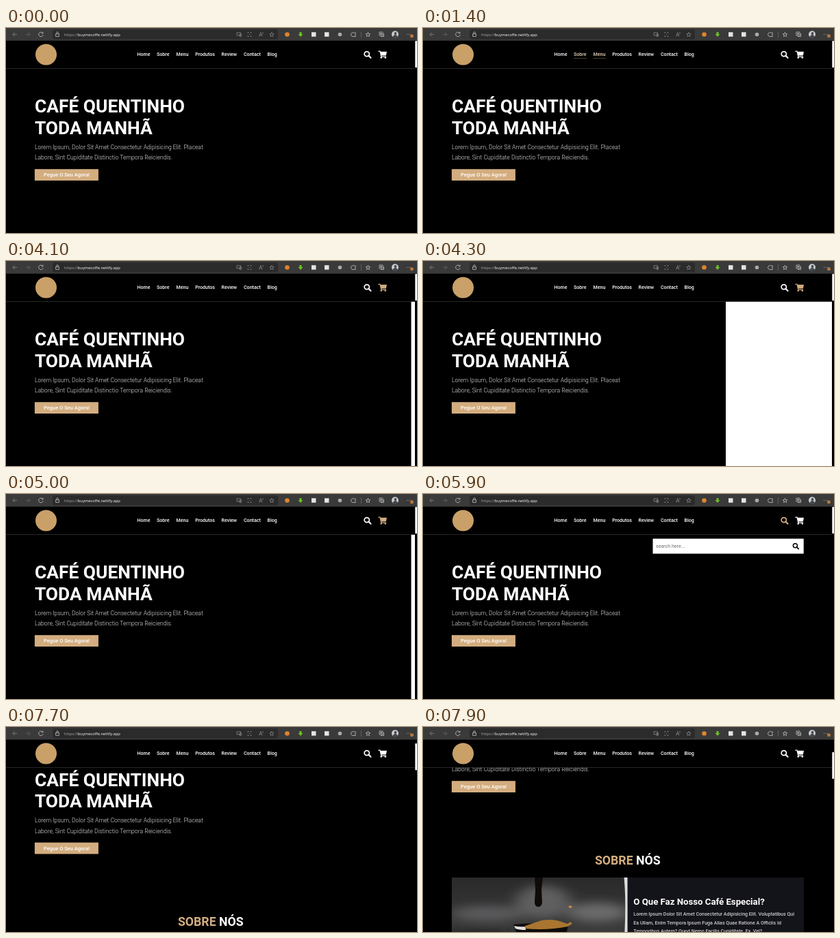
Animation, 600 px wide and 301 px high, one loop 8000 ms. Source, as an HTML page:

```html
<!DOCTYPE html>
<html lang="pt">
<head>
<meta charset="utf-8">
<title>Café</title>
<style>
  html, body { margin: 0; height: 100%; overflow: hidden; background: #000; }
  svg { display: block; width: 100vw; height: 100vh; }
  text { font-family: Roboto, sans-serif; fill: #fff; white-space: pre; }
  .ui { font-family: "Open Sans", sans-serif; }
  .nav text { font-size: 7.09px; font-weight: 500; }
  .title { font-size: 26.4px; font-weight: 700; }
  .lead { font-size: 8.65px; font-weight: 300; fill: #e4e4e4; }
  .body text { font-size: 7.09px; font-weight: 500; fill: #ccc; }
  .line { fill: none; stroke: #c4c4c4; stroke-width: .8; }
</style>
</head>
<body>
<svg viewBox="0 0 600 301">
  <defs>
    <linearGradient id="wall" x2="0" y2="1">
      <stop offset="0" stop-color="#2a2a2b"/>
      <stop offset=".5" stop-color="#3c3c3d"/>
    </linearGradient>
    <filter id="blur" x="-50%" y="-100%" width="200%" height="300%">
      <feGaussianBlur stdDeviation="11 7"/>
    </filter>
    <clipPath id="photo"><rect x="42" y="349" width="256.5" height="172"/></clipPath>
    <g id="lens" fill="none" stroke="currentColor">
      <circle cx="4.5" cy="4.5" r="3.6" stroke-width="1.75"/>
      <path d="M7.2 7.2 10.2 10.2" stroke-width="2.1" stroke-linecap="round"/>
    </g>
    <path id="star" d="M0-3.2 .9-1 3.2-.8 1.4.7 2 3 0 1.7-2 3-1.4.7-3.2-.8-.9-1Z"/>
  </defs>

  <g id="page">
    <text class="title" x="41.9" y="124.4">CAFÉ QUENTINHO</text>
    <text class="title" x="41.9" y="155.6">TODA MANHÃ</text>
    <text class="lead" x="41.9" y="177.5">Lorem Ipsum, Dolor Sit Amet Consectetur Adipisicing Elit. Placeat</text>
    <text class="lead" x="41.9" y="193.4">Labore, Sint Cupiditate Distinctio Tempora Reiciendis.</text>
    <rect x="41.9" y="207.2" width="93" height="16.8" fill="#d3ad7f"/>
    <text x="55" y="218.2" font-size="7.53" font-weight="500">Pegue O Seu Agora!</text>

    <text x="298.8" y="329.5" font-size="17.7" font-weight="700" text-anchor="middle"><tspan fill="#d3ad7f">SOBRE</tspan> NÓS</text>
    <rect x="42" y="349" width="514" height="172" fill="#13131a"/>
    <g clip-path="url(#photo)">
      <rect x="42" y="349" width="257" height="172" fill="url(#wall)"/>
      <g filter="url(#blur)">
        <ellipse cx="95" cy="402" rx="55" ry="11" fill="#5c5c5d"/>
        <ellipse cx="175" cy="385" rx="40" ry="24" fill="#5e5e5f"/>
        <ellipse cx="255" cy="400" rx="45" ry="14" fill="#6a6a6b"/>
        <ellipse cx="80" cy="432" rx="60" ry="8" fill="#262627"/>
      </g>
      <path d="M293.500 349h6v172h-4q-3-50-1-95t-1-77Z" fill="#ddd"/>
      <path d="M163 349h12l-2 17 1 20q-1 6-6 6t-5-7l1-18Z" fill="#100a09"/>
      <path d="M132 418q36-4 80 0l-4 22h-68Z" fill="#0d0b0a"/>
      <path d="M133 420q8 2 17 1v5q-10 0-15-2Z" fill="#e0e0e0"/>
      <path d="M149 420q12-4 24-8 18-3 32 3l6 2 4-3 3 3-7 4q-30 6-62 3Z" fill="#a97630"/>
      <path d="M212 391l4-1 2 3-4 1Z" fill="#c98a3f"/>
    </g>
    <text x="307.3" y="389" font-size="13.2" font-weight="700">O Que Faz Nosso Café Especial?</text>
    <g class="body">
      <text x="307.3" y="405">Lorem Ipsum Dolor Sit Amet Consectetur Adipisicing Elit. Voluptatibus Qui</text>
      <text x="307.3" y="417.7">Ea Ullam, Enim Tempora Ipsum Fuga Alias Quae Ratione A Officiis Id</text>
      <text x="307.3" y="430.4">Temporibus Autem? Quod Nemo Facilis Cupiditate. Ex, Vel?</text>
    </g>
  </g>

  <rect id="panel" y="59.5" width="155" height="242" fill="#fff"/>

  <rect y="18" width="600" height="41" fill="#000"/>
  <rect y="59" width="597" height=".8" fill="#333"/>
  <circle cx="58.5" cy="39" r="15.5" fill="#c9a068"/>
  <g id="nav" class="nav"></g>
  <g id="search" transform="translate(522.3 33.6)"><use href="#lens"/></g>
  <g id="cart" transform="translate(543.4 33.4)" fill="currentColor">
    <path d="M.5.8H2.6L4.5 8.8H11.2" fill="none" stroke="currentColor" stroke-width="1.3" stroke-linecap="round"/>
    <path d="M3 1.4h9.1q.5 0 .4.5l-1 4.7q-.1.5-.6.5H4.2Z"/>
    <circle cx="4.3" cy="10" r="1.25"/><circle cx="10.4" cy="10" r="1.25"/>
  </g>

  <g id="form">
    <rect x="335.5" width="220.2" height="22" fill="#fff"/>
    <text x="340" y="13.3" font-size="7.09" style="fill:#6d6d6d">search here...</text>
    <use href="#lens" transform="translate(539.6 6.3) scale(.85)" color="#000"/>
  </g>

  <rect x="597" y="18" width="3" height="283" fill="#000"/>
  <rect id="thumb" x="597.3" width="2.7" height="39.5" rx="1.2" fill="#fff"/>

  <rect width="600" height="18.6" fill="#3a3a3a"/>
  <rect x="68" y="2.3" width="329" height="14.2" rx="3" fill="#2b2b2b"/>
  <g class="line">
    <path d="M16 9.4H10M12.8 6.5 10 9.4l2.8 2.9" stroke="#888"/>
    <path d="M29 9.4h6M32.2 6.5 35 9.4l-2.8 2.9" stroke="#666"/>
    <path d="M53.6 7.4A3.3 3.3 0 1 0 54.2 10M54 5.6v2.2h-2.2"/>
    <path d="M72.6 8.6h4.8v3.8h-4.8ZM73.7 8.4V7.2q0-1.4 1.3-1.4t1.3 1.4v1.2"/>
    <g stroke="#888">
      <path d="M337 6.8h5.5v4H337ZM341 9h2.6v3.4H341Z"/>
      <path d="M353 8V6.5h1.5M356.5 6.5H358V8M358 11v1.5h-1.5M354.5 12.5H353V11M355 9.5h1"/>
      <path d="M369.5 12.5 371.7 6.5 374 12.5M370.3 10.5h2.8M374.5 6q1.5 1.5 0 3"/>
      <use href="#star" x="388" y="9.5"/>
    </g>
    <path d="M505 7h1.5q.8-2 2 0h1.8v2q-2 1 0 2v1.5H506A3 3 0 0 1 505 7Z"/>
    <path d="M518.5 5v9" stroke="#666"/>
    <use href="#star" x="528.5" y="9.5"/>
    <path d="M545 6h5v5h-5ZM547 12.5h4.5V8M547.5 7v3M546 8.5h3"/>
    <path d="M585 9.4h.9M587.3 9.4h.9M589.6 9.4h.9"/>
  </g>
  <circle cx="410.5" cy="9.5" r="3.3" fill="#e08330"/>
  <path d="M428.5 6h3v3h2l-3.5 4-3.5-4h2Z" fill="#6cc025"/>
  <rect x="446" y="6.2" width="6.5" height="6.5" fill="#e4e4e4"/>
  <rect x="465" y="6.2" width="6.5" height="6.5" fill="#e4e4e4"/>
  <circle cx="487.5" cy="9.5" r="2.8" fill="#aaa"/>
  <circle cx="568" cy="9.3" r="5" fill="#c9cccf"/>
  <circle cx="568.5" cy="8" r="1.9" fill="#44464a"/>
  <path d="M564.8 13q.7-3 3.5-3t3.3 3a5 5 0 0 1-6.8 0Z" fill="#44464a"/>
  <circle cx="592.5" cy="11.8" r="2.5" fill="#b5773f"/>
  <text class="ui" x="85" y="11.6" font-size="5.8" style="fill:#aaa">https://<tspan fill="#fff" font-weight="500" style="fill:#fff">buymecoffe.netlify.app</tspan></text>

  <g id="status">
    <path d="M0 295.5H95.5q2 0 2 2V301H0Z" fill="#2b2b2b"/>
    <text class="ui" x="1.5" y="301.6" font-size="5.1" style="fill:#999">https://buymecoffe.netlify.app/#contact</text>
  </g>
</svg>
<script>
const LOOP = 8000, STEP = 100, FADE = 200;
const $ = id => document.getElementById(id);
const ramp = (t, start, length = FADE) => Math.min(1, Math.max(0, (t - start) / length));
const between = (t, on, off) => ramp(t, on) - ramp(t, off);
const tint = k => `rgb(${[211, 173, 127].map(c => 255 + (c - 255) * k)})`;

// label, left, width, hover start, hover end
const links = [
  ['Home', 191.5, 19.3, 850, 1080],
  ['Sobre', 220, 19, 1080, 1300],
  ['Menu', 248.5, 18.3, 1300, 1500],
  ['Produtos', 276.2, 28.8, 1500, 1780],
  ['Review', 314.5, 23, 1780, 2100],
  ['Contact', 347, 25, 2150, 2780],
  ['Blog', 381.5, 14.8, 2950, 3400]
].map(([label, x, width, on, off]) => {
  const add = (tag, attrs) => {
    const el = document.createElementNS('http://www.w3.org/2000/svg', tag);
    for (const key in attrs) el.setAttribute(key, attrs[key]);
    return $('nav').appendChild(el);
  };
  const text = add('text', { x, y: 41.4 });
  text.textContent = label;
  return { text, bar: add('rect', { x, width, height: .7, fill: '#d3ad7f' }), on, off };
});

function draw(t) {
  for (const { text, bar, on, off } of links) {
    const k = between(t, on, off);
    text.style.fill = tint(k);
    bar.setAttribute('y', 43 + 2.3 * k);
    bar.setAttribute('opacity', k);
  }
  $('status').setAttribute('opacity', between(t, 2300, 2850));
  $('cart').style.color = tint(between(t, 3650, 5200));
  $('search').style.color = tint(between(t, 5350, 7000));
  $('panel').setAttribute('x', 1040 - 598 * between(t, 3950, 4950));
  $('form').setAttribute('transform', `translate(0 65.6) scale(1 ${between(t, 5650, 6750)})`);

  const scroll = 128 * ramp(t, 7400, 500) ** 2.4;
  $('page').setAttribute('transform', `translate(0 ${-scroll})`);
  $('thumb').setAttribute('y', 18.8 + scroll * .14);
}

function tick() {
  draw(Math.floor(performance.now() % LOOP / STEP) * STEP);
  requestAnimationFrame(tick);
}
tick();
</script>
</body>
</html>
```
